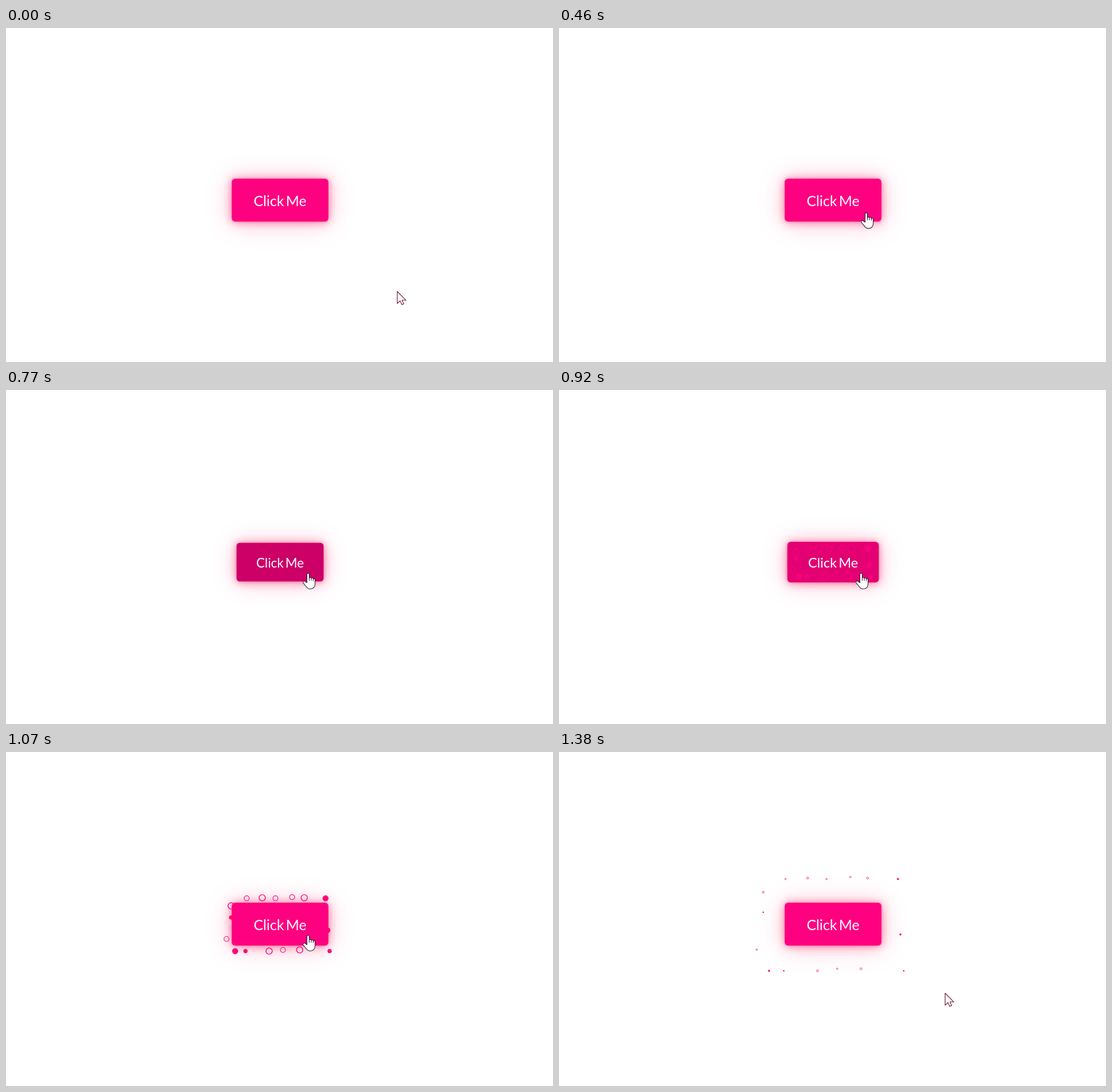
Write an HTML page that moves like this. It is 957 px wide and 585 px high and loops after 1460 ms.

```html
<!DOCTYPE html>
<html lang="en">
<head>
<meta charset="utf-8">
<title>Bubbly button</title>
<style>
  html, body { margin: 0; width: 100%; height: 100%; overflow: hidden; background: #fff; }
  #stage { position: relative; width: 957px; height: 585px; overflow: hidden; }
  #stage > * { position: absolute; }
  svg { left: 0; top: 0; width: 957px; height: 585px; overflow: visible; }
  #button {
    z-index: 1; left: 395px; top: 264px; width: 169px; height: 75px;
    border-radius: 6px; color: #fff; text-align: center;
    font: 25px/76px Lato, sans-serif; word-spacing: -3px;
    box-shadow: 0 0 3px rgba(255, 0, 90, .4), 0 1px 16px rgba(255, 0, 70, .5), 0 2px 45px rgba(255, 0, 90, .25);
  }
  #pointer { z-index: 3; fill: #fff; stroke-width: 1.1; stroke-linejoin: round; }
</style>
</head>
<body>
<div id="stage">
  <svg id="bubbles"></svg>
  <div id="button">Click Me</div>
  <svg id="pointer">
    <path id="arrow" d="M.5 .5V21.5L5.5 16.8 8.5 23.5 12 22.2 9 15.8H15.8Z"/>
    <path id="hand" transform="translate(-9 -.5)" d="M7.5 17V2.5a2 2 0 0 1 4 0V13V9.5a1.75 1.75 0 0 1 3.5 0V13V10.3a1.75 1.75 0 0 1 3.5 0V13.5V11.5a1.6 1.6 0 0 1 3.2 0V19c0 5-3 9-8 9-4.5 0-6.5-2.3-8.5-5.5L.9 17.3C-.2 15 2.6 13 4.3 14.8Z"/>
  </svg>
</div>
<script>
const LOOP = 1460, FRAMES = 19, FRAME = LOOP / FRAMES;
const PRESS = 650, RELEASE = 854, BURST = 900, LEAVE = 1070;
const CENTER = { x: 479.5, y: 302 };
const PINK = '#ff0081';

// Offsets from the button's centre; large and small ones alternate.
const rings = [[-31, -46], [-58, -45], [42, -46], [-8, -45], [-85, -32], [21, -47], [-19, 46], [-93, 25], [34, 44], [5, 44]];
const discs = [[79, -45], [-85, -12], [82, 10], [-60, 46], [-78, 46], [86, 46]];

const $ = id => document.getElementById(id);
const clamp = x => Math.min(1, Math.max(0, x));
const mix = (a, b, k) => a + (b - a) * k;
const smooth = x => clamp(x) ** 2 * (3 - 2 * clamp(x));
const easeIn = x => clamp(x) ** 1.7;
const curve = (a, b, c, k) => mix(mix(a, b, k), mix(b, c, k), k);

function makeBubble([x, y], i, ring) {
  const el = $('bubbles').appendChild(document.createElementNS('http://www.w3.org/2000/svg', 'circle'));
  const small = i % 2;
  el.setAttribute('fill', ring ? 'none' : PINK);
  el.setAttribute('stroke', ring ? PINK : 'none');
  return { el, x, y, ring, radius: ring ? (small ? 5.7 : 7.1) : (small ? 4.2 : 6) };
}

const bubbles = [
  ...rings.map((p, i) => makeBubble(p, i, true)),
  ...discs.map((p, i) => makeBubble(p, i, false))
];

function drawBubbles(t, pressed) {
  const layer = $('bubbles').style;
  layer.display = t < BURST ? 'none' : '';
  layer.zIndex = pressed ? 2 : 0;
  layer.opacity = pressed ? .7 : 1;

  // Fast spread, then a slow drift while the bubbles shrink away.
  const spread = (smooth((t - BURST) / 375) - .42) / .53;
  const drift = .11 * Math.max(0, (t - 1220) / 160);
  const size = 1 - smooth((t - BURST) / 750);
  for (const { el, x, y, ring, radius } of bubbles) {
    const r = radius * size;
    const line = ring ? Math.max(.8, r * .23) : 0;
    el.setAttribute('cx', CENTER.x + x * (1 + .3 * spread + drift));
    el.setAttribute('cy', CENTER.y + y * (1 + .6 * spread + drift));
    el.setAttribute('r', r - line / 2);
    el.setAttribute('stroke-width', line);
  }
}

function drawButton(pressed) {
  const style = $('button').style;
  style.transform = pressed ? `scale(${1 - .1 * pressed})` : 'none';
  style.background = `rgb(${mix(255, 204, pressed)}, 0, ${mix(129, 103, pressed)})`;
}

function pointerAt(t) {
  if (t < LEAVE) {
    const k = smooth(t / 540);
    return [curve(684, 597, 528, k), curve(461, 338, 321, k)];
  }
  const k = clamp((t - LEAVE) / 308);
  return [mix(528, 675, k ** 2.7), mix(321, 422, k ** 2.2)];
}

function drawPointer(t) {
  const [x, y] = pointerAt(t);
  const hand = x < 597 && y < 395;
  $('arrow').style.display = hand ? 'none' : '';
  $('hand').style.display = hand ? '' : 'none';
  $('pointer').style.transform = `translate(${x}px, ${y}px)`;
  $('pointer').style.stroke = !hand || t > LEAVE + FRAME / 2 ? '#6b1238' : '#25222f';
}

function draw(now) {
  const frame = Math.min(FRAMES - 1, Math.floor((now % LOOP + 10) / FRAME));
  const t = Math.max(0, frame * FRAME - 5);
  const pressed = easeIn((t - PRESS) / 100) - easeIn((t - RELEASE) / 100);
  drawBubbles(t, pressed);
  drawButton(pressed);
  drawPointer(t);
}

const start = performance.now();
function tick() {
  draw(performance.now() - start);
  requestAnimationFrame(tick);
}
tick();
</script>
</body>
</html>
```
